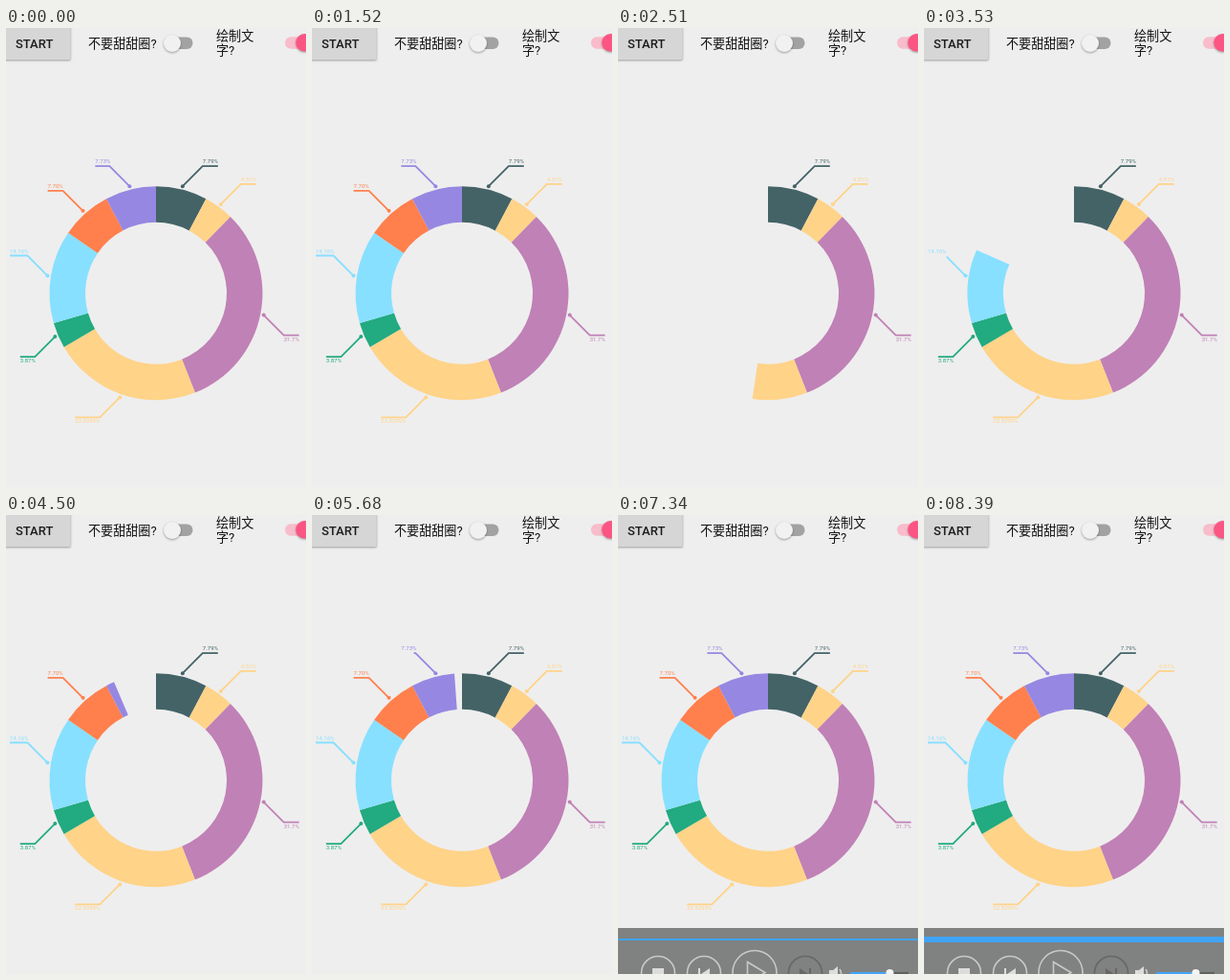
These frames come from a looping animation (314x479 px, 9100 ms). An HTML page:

```html
<!DOCTYPE html>
<html lang="zh">
<head>
<meta charset="utf-8">
<title>Donut chart</title>
<style>
  html, body { margin: 0; width: 100%; height: 100%; overflow: hidden; background: #eee; }
  svg { display: block; width: 314px; height: 479px; }
  .cjk { font: 13.1px Roboto, "Noto Sans CJK SC", "Noto Sans CJK", sans-serif; fill: #111; }
  .start { font: 500 13px Roboto, sans-serif; fill: #1c1c1c; }
  .label { font: 6px Roboto, sans-serif; }
  .shadow { filter: drop-shadow(0 1px 1px rgba(0, 0, 0, .35)); }
</style>
</head>
<body>
<svg viewBox="0 0 314 479">
  <rect width="314" height="479" fill="#eee"/>

  <rect class="shadow" x="-4" y="-4" width="71.5" height="37" rx="1.5" fill="#d6d6d6"/>
  <rect id="press" x="-4" y="-4" width="71.5" height="37" rx="1.5" opacity="0"/>
  <text class="start" x="10" y="21">START</text>

  <text class="cjk" x="86" y="21">不要甜甜圈?</text>
  <rect x="168" y="9.5" width="27.5" height="12.5" rx="6.2" fill="#a2a2a2"/>
  <circle class="shadow" cx="174" cy="16" r="9" fill="#f1f1f1"/>

  <text class="cjk" x="220" y="13">绘制文</text>
  <text class="cjk" x="220" y="28">字?</text>
  <rect x="292" y="9.3" width="30" height="12.5" rx="6.2" fill="#f8bccb"/>
  <circle class="shadow" cx="312.7" cy="15.3" r="9.3" fill="#fb5583"/>

  <g id="chart"></g>

  <g id="player" opacity="0">
    <rect y="431" width="314" height="48" fill="#808181"/>
    <rect id="seek" y="442" width="314" height="2" fill="#40a4f8"/>
    <g fill="none" stroke="#c9c9c9" stroke-width="1.6">
      <circle cx="42" cy="478" r="17.5"/>
      <circle cx="90" cy="478" r="17.5"/>
      <circle cx="143" cy="477.5" r="23"/>
      <circle cx="196" cy="478" r="17.5" stroke="#666"/>
      <path d="M135.500 466.500V489L154 477.500Z"/>
      <path d="M232 474q3 4 0 8"/>
    </g>
    <g fill="#dcdcdc">
      <rect x="36" y="473" width="12" height="12"/>
      <path d="M84 473h2v12h-2zM96 473v12l-9 -6z"/>
      <path d="M221 475h4l5 -4v14l-5 -4h-4z"/>
    </g>
    <path d="M190 473v12l9 -6zM200 473h2v12h-2z" fill="#666"/>
    <rect x="243" y="477" width="61" height="2" fill="#606060"/>
    <rect x="243" y="477" width="41" height="2" fill="#40a4f8"/>
    <circle cx="284.500" cy="478" r="4" fill="#f4f4f4"/>
  </g>
</svg>

<script>
const LOOP = 9100, CLEAR = 1570;
const CX = 157, CY = 276.8, OUTER = 111.5, INNER = 74, DOT = 115;

// color, end angle, label, length of the underline
const slices = [
  ['#446367', 28, '7.79%', 16],
  ['#ffd388', 44.3, '4.51%', 16],
  ['#c081b6', 158.5, '31.7%', 16],
  ['#ffd388', 239.8, '22.5299%', 26],
  ['#22aa80', 253.8, '3.87%', 15.5],
  ['#87e0ff', 304.5, '14.16%', 18.5],
  ['#ff804d', 332.2, '7.70%', 16],
  ['#9687e2', 360, '7.73%', 15]
];

// sweep of the ring: time, angle
const sweep = [
  [1595, 0], [1800, 49.7], [2400, 170.5], [2510, 188.3], [3020, 251], [3530, 293.8],
  [4320, 331.8], [5250, 351.4], [5680, 355.9], [6210, 358.5], [6960, 360]
];

const $ = id => document.getElementById(id);
const clamp = v => Math.min(1, Math.max(0, v));

function add(parent, tag, attrs) {
  const node = document.createElementNS('http://www.w3.org/2000/svg', tag);
  for (const key in attrs) node.setAttribute(key, attrs[key]);
  return parent.appendChild(node);
}

function polar(radius, deg) {
  const a = deg * Math.PI / 180;
  return [CX + radius * Math.sin(a), CY - radius * Math.cos(a)];
}

function wedge(from, to) {
  const large = to - from > 180 ? 1 : 0;
  return `M${polar(OUTER, from)}A${OUTER} ${OUTER} 0 ${large} 1 ${polar(OUTER, to)}` +
    `L${polar(INNER, to)}A${INNER} ${INNER} 0 ${large} 0 ${polar(INNER, from)}Z`;
}

const parts = slices.map(([color, end, text, width], i) => {
  const start = i ? slices[i - 1][1] : 0;
  const mid = (start + end) / 2;
  const [x, y] = polar(DOT, mid);
  const right = mid < 180 ? 1 : -1;
  const down = mid > 90 && mid < 270 ? 1 : -1;
  const bendX = x + 21 * right, bendY = y + 21 * down;
  const tipX = bendX + width * right;

  const area = add($('chart'), 'path', { fill: color });
  const label = add($('chart'), 'g', { fill: color });
  add(label, 'circle', { cx: x, cy: y, r: 2 });
  const line = add(label, 'path', {
    d: `M${x} ${y}L${bendX} ${bendY}H${tipX}`, fill: 'none', stroke: color, 'stroke-width': 1.8
  });
  add(label, 'text', {
    class: 'label', x: Math.min(bendX, tipX), y: bendY + (down > 0 ? 6 : -3)
  }).textContent = text;
  return { start, mid, end, area, label, line, length: 21 * Math.SQRT2 + width };
});

const chord = i => (sweep[i + 1][1] - sweep[i][1]) / (sweep[i + 1][0] - sweep[i][0]);

// harmonic mean of the neighbouring chords keeps the curve monotone
function slope(i) {
  if (i === 0) return chord(0) * 1.05;
  if (i === sweep.length - 1) return 0;
  const a = chord(i - 1), b = chord(i);
  return 2 * a * b / (a + b);
}

function angleAt(t) {
  const last = sweep.length - 1;
  if (t < CLEAR || t >= sweep[last][0]) return 360;
  if (t <= sweep[0][0]) return 0;
  const i = sweep.findIndex(p => p[0] > t) - 1;
  const [t0, a0] = sweep[i], [t1, a1] = sweep[i + 1];
  const h = t1 - t0, u = (t - t0) / h, v = 1 - u;
  return a0 * v * v * (1 + 2 * u) + a1 * u * u * (3 - 2 * u) +
    h * u * v * (slope(i) * v - slope(i + 1) * u);
}

function draw(t) {
  const angle = angleAt(t);
  for (const p of parts) {
    p.area.setAttribute('d', angle > p.start ? wedge(p.start, Math.min(angle, p.end)) : '');
    const grown = clamp((angle - p.mid) / (p.end - p.mid));
    p.label.setAttribute('visibility', grown > 0 ? 'visible' : 'hidden');
    p.line.setAttribute('stroke-dasharray', grown < 1 ? `${grown * p.length} 99` : 'none');
  }
  $('press').setAttribute('opacity', 0.06 * clamp((t - 1520) / 80) * clamp((2400 - t) / 500));
  $('player').setAttribute('opacity', clamp((t - 7175) / 160));
  const hover = t >= 8390;
  $('seek').setAttribute('y', hover ? 440 : 442);
  $('seek').setAttribute('height', hover ? 6 : 2);
}

const begin = performance.now();
function tick() {
  draw((performance.now() - begin) % LOOP);
  requestAnimationFrame(tick);
}
tick();
</script>
</body>
</html>
```
